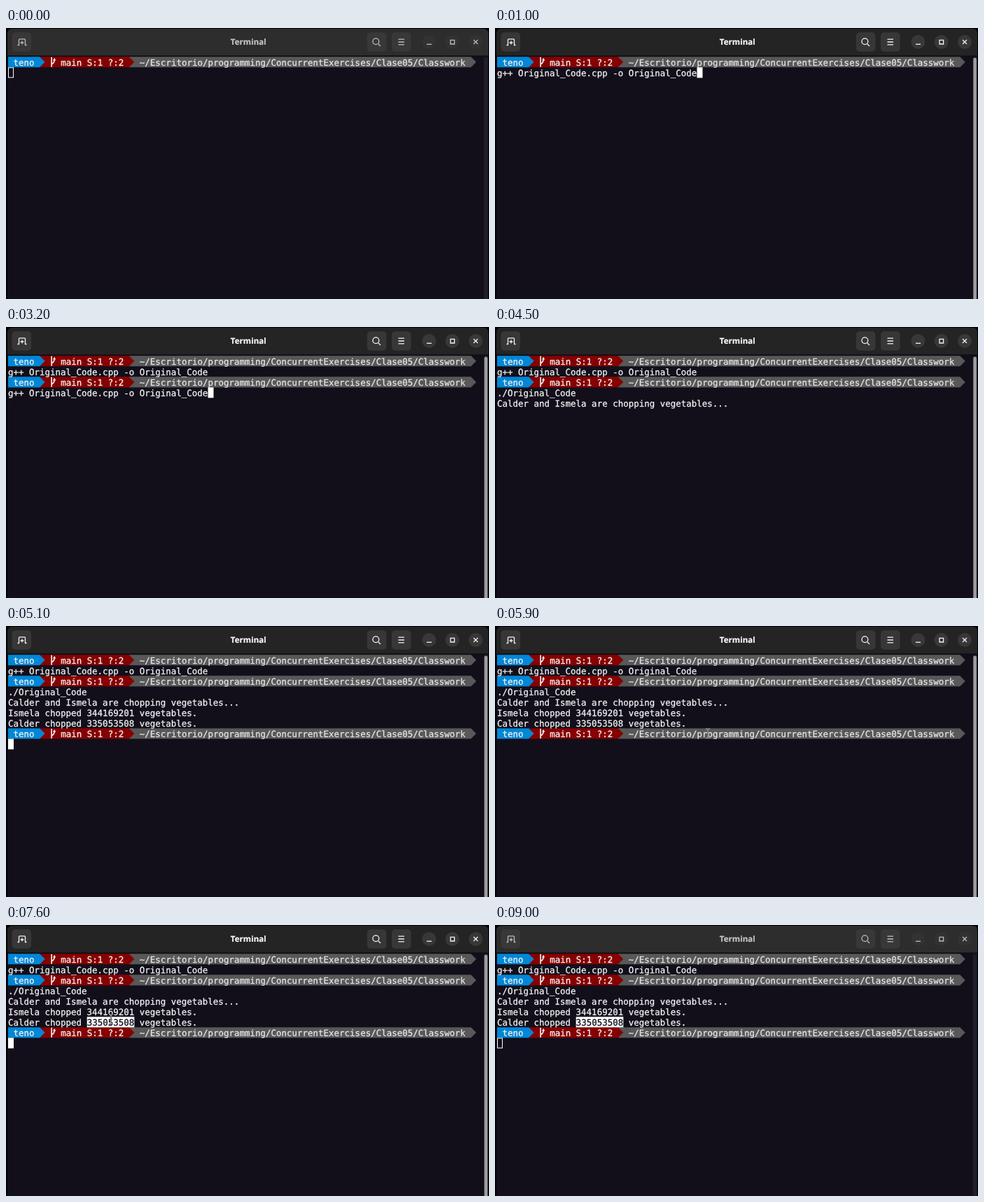
An HTML page for the animation above (9.4 s loop, 690 by 388 pixels).

```html
<!DOCTYPE html>
<html lang="es">
<head>
<meta charset="utf-8">
<title>Terminal</title>
<style>
  html, body { margin: 0; width: 100%; height: 100%; overflow: hidden; background: #000; }
  svg { display: block; width: 690px; height: 388px; }
  text { white-space: pre; text-rendering: geometricPrecision; fill: currentColor; stroke: currentColor; }
  .mono { font: 12.48px "DejaVu Sans Mono", monospace; color: #f0f0f0; stroke-width: .3px; }
  .title { font: bold 11.6px "Open Sans", "Noto Sans", sans-serif; text-anchor: middle; stroke-width: .2px; }
  .icon { fill: none; stroke-width: 1.3; }
</style>
</head>
<body>
<svg id="stage" viewBox="0 0 690 388" xmlns="http://www.w3.org/2000/svg"></svg>
<script>
const LOOP = 9400;
const COL = 7.514, ROW = 15.03, LEFT = 3, TOP = 41.3;
const BG = '#120f1b';
const USER = 'teno';
const PATH = '~/Escritorio/programming/ConcurrentExercises/Clase05/Classwork';
const COMPILE = 'g++ Original_Code.cpp -o Original_Code';
const RUN = './Original_Code';
const stage = document.getElementById('stage');

const colX = col => LEFT + col * COL;
const rowY = row => TOP + row * ROW;
const clamp = v => Math.min(1, Math.max(0, v));
const mix = (a, b, k) => a + (b - a) * k;
const grey = (a, b, k) => { const v = Math.round(mix(a, b, k)); return `rgb(${v},${v},${v})`; };
const ease = k => k * k * (3 - 2 * k);

function add(tag, attrs = {}, parent = stage) {
  const node = document.createElementNS('http://www.w3.org/2000/svg', tag);
  set(node, attrs);
  return parent.appendChild(node);
}
function set(node, attrs) {
  for (const name in attrs) node.setAttribute(name, attrs[name]);
}
const show = (node, on) => node.setAttribute('visibility', on ? 'visible' : 'hidden');

function write(row, col, content, parent = stage) {
  const node = add('text', { class: 'mono', x: colX(col), y: rowY(row) + 12.4 }, parent);
  node.textContent = content;
  return node;
}

// Window frame and title bar
add('rect', { x: 2, y: 1, width: 687, height: 60, rx: 7, fill: BG });
const header = add('path', { d: 'M2 40V8Q2 1 9 1H682Q689 1 689 8V40Z' });
add('rect', { x: 2, y: 40, width: 687, height: 348, fill: BG });
add('rect', { x: 2, y: 39.5, width: 687, height: 1, fill: '#0b0a10' });
add('rect', { x: 682, y: 41, width: 7, height: 347, fill: '#181521' });
const thumb = add('rect', { x: 683.3, y: 42.5, width: 4.6, height: 352, rx: 2.3 });

const buttons = [8.5, 515.8, 551].map(x => add('rect', { x, y: 6.3, width: 27.6, height: 27.4, rx: 5 }));
const circles = [604.4, 637.6, 671].map(cx => add('circle', { cx, cy: 20, r: 10 }));
const icons = add('g', { class: 'icon' });
[
  'M16.5 24.5H18.5V17Q18.5 15.8 19.7 15.8H26.3Q27.5 15.8 27.5 17V24.5H29.5M23 18.5V23.5M20.5 21H25.5',
  'M532 23L535 26M532.8 19.2A4.4 4.4 0 1 1 524 19.2A4.4 4.4 0 1 1 532.8 19.2',
  'M560.5 16.2H569M560.5 20H569M560.5 23.8H569',
  'M601 23.3H608',
  'M635 17.3H640.6V23H635Z',
  'M668 17L674 23M674 17L668 23'
].forEach(d => add('path', { d }, icons));
const title = add('text', { class: 'title', x: 346.3, y: 24.3 });
title.textContent = 'Terminal';

// Shell prompt: three arrow-ended segments
function prompt(row) {
  const group = add('g');
  const top = rowY(row), mid = top + ROW / 2, bottom = top + ROW;
  const segment = (from, to, fill) => add('path', {
    d: `M${colX(from)} ${top}H${colX(to)}L${colX(to + 1)} ${mid}L${colX(to)} ${bottom}H${colX(from)}Z`, fill
  }, group);
  segment(23, 88, '#585858');
  segment(6, 23, '#870000');
  segment(0, 6, '#0087d7');
  write(row, 1, USER, group);
  write(row, 10, 'main S:1 ?:2', group);
  write(row, 25, PATH, group).style.color = '#e4e4e4';
  const x = colX(8);
  add('path', {
    d: `M${x + 2} ${top + .5}V${top + 14.5}M${x + 2} ${top + 10.5}Q${x + 6} ${top + 9} ${x + 6} ${top + 4}`,
    fill: 'none', stroke: '#f0f0f0', 'stroke-width': 1.7
  }, group);
  add('path', { d: `M${x + 3.8} ${top + 5.2}H${x + 8.2}L${x + 6} ${top + 1.5}Z`, fill: '#f0f0f0' }, group);
  return group;
}
prompt(0);
const secondPrompt = prompt(2);
const lastPrompt = prompt(7);

const firstCommand = write(1, 0, '');
const secondCommand = write(3, 0, '');
const progress = write(4, 0, 'Calder and Ismela are chopping vegetables...');
const results = add('g');
write(5, 0, 'Ismela chopped 344169201 vegetables.', results);
write(6, 0, 'Calder chopped 335053508 vegetables.', results);

function selection(row, digits) {
  const group = add('g');
  add('rect', { x: colX(15), y: rowY(row), width: 9 * COL, height: ROW, fill: '#fff' }, group);
  write(row, 15, digits, group).style.color = BG;
  return group;
}
const firstPick = selection(5, '344169201');
const secondPick = selection(6, '335053508');

const cursor = add('rect');

const pointer = add('g', { fill: 'none' });
const beam = 'M-3 -7Q0 -7 0 -5Q0 -7 3 -7M0 -5V5M-3 7Q0 7 0 5Q0 7 3 7';
add('path', { d: beam, stroke: '#333', 'stroke-width': 2 }, pointer);
add('path', { d: beam, stroke: '#c4c4c4', 'stroke-width': 1 }, pointer);

// Moves: start, end, from, to
const MOVES = [
  [50, 200, [630, 400], [609, 212]],
  [5400, 6250, [609, 212], [127, 120]],
  [6850, 7100, [127, 120], [150, 135]],
  [8300, 8600, [150, 135], [330, 400]]
];
function pointerAt(t) {
  let place = MOVES[0][2];
  for (const [start, end, from, to] of MOVES) {
    if (t < start) break;
    const k = ease(clamp((t - start) / (end - start)));
    place = [mix(from[0], to[0], k), mix(from[1], to[1], k)];
  }
  return place;
}

// Key presses restart the blink: 600 ms on, 600 ms off
const KEYS = [200, 800, 900, 1400, 2900, 3300, 3900];
function cursorLit(t) {
  const last = KEYS.filter(key => key <= t).pop() || 0;
  return Math.floor((t - last) / 600) % 2 === 0;
}
function cursorCell(t) {
  if (t < 800) return [1, 0];
  if (t < 1400) return [1, firstCommand.textContent.length];
  if (t < 2400) return [2, 0];
  if (t < 3900) return [3, secondCommand.textContent.length];
  return t < 4900 ? [5, 0] : [8, 0];
}

function draw(t) {
  const focused = t >= 200 && t < 8600;
  const focus = clamp((t - 200) / 200) * (1 - clamp((t - 8600) / 200));

  header.setAttribute('fill', grey(45, 36, focus));
  thumb.setAttribute('fill', `rgb(${mix(34, 158, focus)},${mix(31, 157, focus)},${mix(42, 160, focus)})`);
  buttons.forEach(b => b.setAttribute('fill', grey(56, 55, focus)));
  circles.forEach(c => c.setAttribute('fill', grey(50, 56, focus)));
  icons.setAttribute('stroke', grey(190, 245, focus));
  title.style.color = grey(196, 247, focus);

  firstCommand.textContent = t < 800 ? '' : t < 900 ? RUN : COMPILE;
  secondCommand.textContent = t < 2900 ? '' : t < 3300 ? COMPILE : RUN;
  show(secondPrompt, t >= 2400);
  show(progress, t >= 3900);
  show(results, t >= 4900);
  show(lastPrompt, t >= 4900);
  show(firstPick, t >= 6600 && t < 7400);
  show(secondPick, t >= 7500);

  const [row, col] = cursorCell(t);
  const inset = focused ? 0 : .5;
  set(cursor, {
    x: colX(col) + inset, y: rowY(row) + inset,
    width: 8 - 2 * inset, height: ROW - 2 * inset,
    fill: focused ? '#fff' : 'none', stroke: focused ? 'none' : '#fff'
  });
  show(cursor, !focused || cursorLit(t));

  const [x, y] = pointerAt(t);
  pointer.setAttribute('transform', `translate(${x} ${y})`);
  show(pointer, t < 800 || t >= 5400);
}

const begin = performance.now();
function tick() {
  draw((performance.now() - begin) % LOOP);
  requestAnimationFrame(tick);
}
draw(0);
requestAnimationFrame(tick);
</script>
</body>
</html>
```
